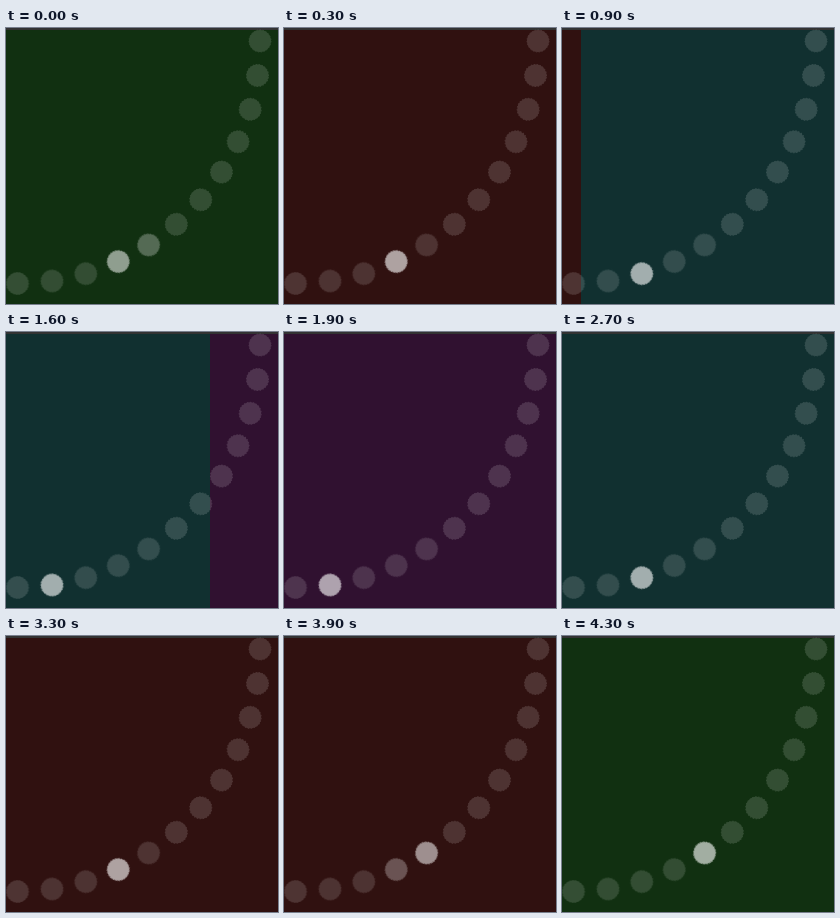
An HTML page without scripts for the animation above (4.8 s loop, 272 by 276 pixels).

```html
<!DOCTYPE html>
<html lang="en">
<head>
<meta charset="utf-8">
<title>Dotted arc slider</title>
<style>
  html, body { margin: 0; width: 100%; height: 100%; overflow: hidden; background: #333; }
  svg { display: block; width: 272px; height: 276px; }

  .track, .a, .b, .c, .d { animation: slide 4.8s step-end infinite; }
  .dots { fill: #fff; stroke: #fff; stroke-dasharray: 1.5; }
  .dots circle { opacity: .145; }
  .dots .a { animation-name: dot-a; }
  .dots .b { animation-name: dot-b; }
  .dots .c { animation-name: dot-c; }
  .dots .d { animation-name: dot-d; }

  /* Ten steps a second, slow-fast-slow: green, red, teal, purple and back */
  @keyframes slide {
    0% { transform: translateX(0); }
    2.08% { transform: translateX(-68px); }
    4.16% { transform: translateX(-253px); }
    6.25% { transform: translateX(-272px); }
    16.66% { transform: translateX(-340px); }
    18.75% { transform: translateX(-525px); }
    20.83% { transform: translateX(-544px); }
    33.33% { transform: translateX(-612px); }
    35.41% { transform: translateX(-797px); }
    37.5% { transform: translateX(-816px); }
    50% { transform: translateX(-748px); }
    52.08% { transform: translateX(-563px); }
    54.16% { transform: translateX(-544px); }
    64.58% { transform: translateX(-530px); }
    66.66% { transform: translateX(-345px); }
    68.75% { transform: translateX(-272px); }
    83.33% { transform: translateX(-204px); }
    85.41% { transform: translateX(-19px); }
    87.5%, 100% { transform: translateX(0); }
  }
  @keyframes dot-a {
    0% { opacity: .28; }
    2.08% { opacity: .145; }
    81.25% { opacity: .53; }
    83.33%, 100% { opacity: .61; }
  }
  @keyframes dot-b {
    0%, 64.58% { opacity: .53; }
    2.08%, 66.66% { opacity: .61; }
    14.58%, 81.25% { opacity: .28; }
    16.66%, 83.33%, 100% { opacity: .145; }
  }
  @keyframes dot-c {
    0%, 33.33%, 66.66%, 100% { opacity: .145; }
    14.58%, 47.91% { opacity: .53; }
    16.66%, 50% { opacity: .61; }
    31.25%, 64.58% { opacity: .28; }
  }
  @keyframes dot-d {
    0%, 50%, 100% { opacity: .145; }
    31.25% { opacity: .53; }
    33.33% { opacity: .61; }
    47.91% { opacity: .28; }
  }
</style>
</head>
<body>
<svg viewBox="0 0 272 276">
  <g class="track">
    <rect width="272" height="276" fill="#113011"/>
    <rect x="272" width="272" height="276" fill="#301110"/>
    <rect x="544" width="272" height="276" fill="#113030"/>
    <rect x="816" width="272" height="276" fill="#301130"/>
  </g>
  <rect width="272" height="2" fill="#333"/>
  <!-- Twelve dots, a quarter turn in eleven steps -->
  <g class="dots" transform="translate(11.5 13)">
    <circle cx="242.5" r="11"/>
    <circle cx="242.5" r="11" transform="rotate(8.182)"/>
    <circle cx="242.5" r="11" transform="rotate(16.364)"/>
    <circle cx="242.5" r="11" transform="rotate(24.545)"/>
    <circle cx="242.5" r="11" transform="rotate(32.727)"/>
    <circle cx="242.5" r="11" transform="rotate(40.909)"/>
    <circle cx="242.5" r="11" transform="rotate(49.091)"/>
    <circle cx="242.5" r="11" transform="rotate(57.273)" class="a"/>
    <circle cx="242.5" r="11" transform="rotate(65.455)" class="b"/>
    <circle cx="242.5" r="11" transform="rotate(73.636)" class="c"/>
    <circle cx="242.5" r="11" transform="rotate(81.818)" class="d"/>
    <circle cx="242.5" r="11" transform="rotate(90)"/>
  </g>
</svg>
</body>
</html>
```
